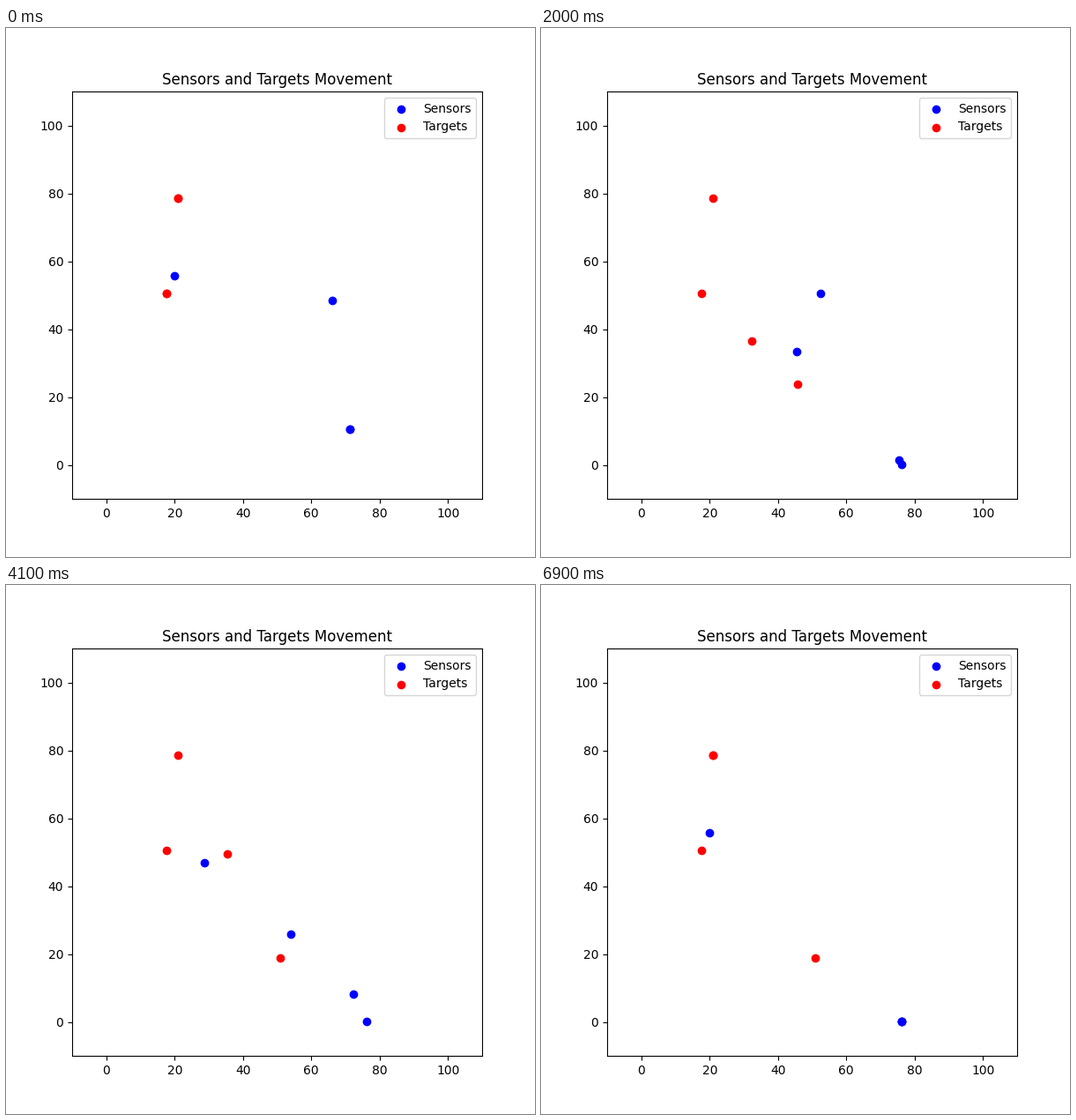
A matplotlib script that plays this animation: 600x600 px, repeating every 7000 ms.

```python
import matplotlib.pyplot as plt
import numpy as np
from matplotlib.animation import FuncAnimation

FRAMES = 70
INTERVAL = 100

PLACES = {
    "A": (20.039, 55.623),
    "B": (66.103, 48.494),
    "C": (71.290, 10.468),
    "D": (76.116, 0.026),
    "P": (20.994, 78.701),
    "Q": (17.587, 50.623),
    "R": (50.852, 18.779),
}

# Each route: stops, then the travel time of each leg in frames
SENSORS = [
    ("ACD", [40.4, 4.6]),
    ("BDCA", [19.2, 7.0, 44.4]),
    ("CBAD", [13.2, 23.45, 32.0]),
    ("CD", [5.7]),
]
TARGETS = [
    ("QRP", [23.65, 35.0]),
    ("PQR", [11.05, 20.2]),
    ("P", []),
    ("Q", []),
]


def position(route, frame):
    """Constant speed per leg; a partial last step snaps to the stop."""
    stops, legs = route
    points = [np.array(PLACES[s]) for s in stops]
    if frame == FRAMES - 1:
        return points[-1]
    for start, end, duration in zip(points, points[1:], legs):
        if frame < int(duration):
            return start + (end - start) * frame / duration
        frame -= int(duration)
    return points[-1]


def positions(routes, frame):
    return np.array([position(r, frame) for r in routes])


fig, ax = plt.subplots(figsize=(6, 6), dpi=100)
ax.set_xlim(-10, 110)
ax.set_ylim(-10, 110)
ax.set_title("Sensors and Targets Movement")
sensor_dots = ax.scatter(*positions(SENSORS, 0).T, c="blue", label="Sensors")
target_dots = ax.scatter(*positions(TARGETS, 0).T, c="red", label="Targets")
ax.legend(loc="upper right")


def update(frame):
    sensor_dots.set_offsets(positions(SENSORS, frame))
    target_dots.set_offsets(positions(TARGETS, frame))
    return sensor_dots, target_dots


anim = FuncAnimation(fig, update, frames=FRAMES, interval=INTERVAL,
                     repeat=True, repeat_delay=0)
plt.show()
```
